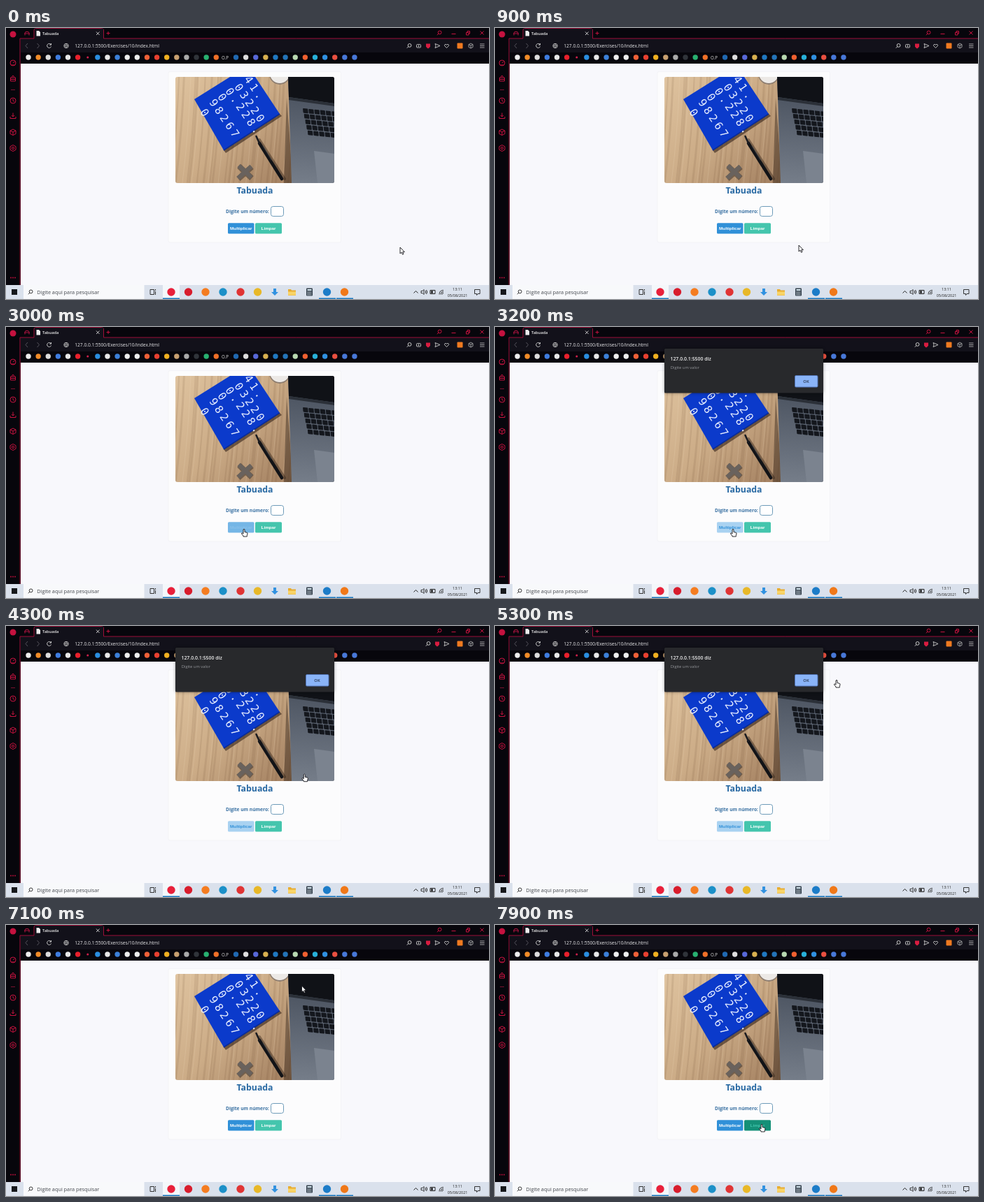
Write an HTML page with a canvas that moves like this. It is 690x388 px and loops after 8000 ms.

```html
<!DOCTYPE html>
<html lang="pt">
<head>
<meta charset="utf-8">
<title>Tabuada</title>
<style>
html, body { margin: 0; width: 100%; height: 100%; overflow: hidden; }
canvas { display: block; width: 690px; height: 388px; }
</style>
</head>
<body>
<canvas id="stage" width="690" height="388"></canvas>
<script>
const c = document.getElementById('stage').getContext('2d');
const LOOP = 8000, RED = '#c5123f', SANS = '"Open Sans", sans-serif', ARIAL = '"Liberation Sans", sans-serif';
const BLUE = [48, 144, 216], PALE = [169, 210, 241], WHITE = [255, 255, 255],
      GREEN = [68, 197, 173], DARK_GREEN = [20, 144, 119];

const ramp = (t, a, b) => Math.min(1, Math.max(0, (t - a) / (b - a)));
const mix = (a, b, p) => `rgb(${a.map((v, i) => Math.round(v + (b[i] - v) * p))})`;

function rect(x, y, w, h, fill, r = 0, stroke, width) {
  c.beginPath();
  c.roundRect(x, y, w, h, r);
  paint(fill, stroke, width);
}
function paint(fill, stroke, width = 1) {
  if (fill) { c.fillStyle = fill; c.fill(); }
  if (stroke) { c.strokeStyle = stroke; c.lineWidth = width; c.stroke(); }
}
function dot(x, y, r, fill, stroke) {
  c.beginPath();
  c.arc(x, y, r, 0, 7);
  paint(fill, stroke);
}
function path(d, fill, stroke, width = 1, x = 0, y = 0) {
  const p = new Path2D(d);
  c.save();
  c.translate(x, y);
  if (fill) { c.fillStyle = fill; c.fill(p); }
  if (stroke) { c.strokeStyle = stroke; c.lineWidth = width; c.stroke(p); }
  c.restore();
}
function text(s, x, y, font, fill, align = 'left') {
  c.font = font;
  c.fillStyle = fill;
  c.textAlign = align;
  c.fillText(s, x, y);
}
function lens(x, y, color) {
  dot(x + .6, y - .6, 2.4, null, color);
  path('M-1.2 1.2L-3.2 3.2', null, color, 1, x, y);
}

const bookmarks = ('#eee #f28c28 #ddd #3f7de0 #e8e8e8 #e8202c #d0204c #2a8ee0 #e8e8e8 #3c80d8 #eee #eee #f06038 ' +
  '#e84030 #f0b020 #c8a070 #aaa #30343a #28b070 #f07028 - #2068b0 #ddd #5868d8 #d8b050 #2078c0 #2474b8 #b8d8b0 ' +
  '#f06030 #28b0d8 #3090e0 #e85040 #4878d8 #4878d8').split(' ');

function browser(modal) {
  rect(0, 0, 690, 51, '#07060c');
  rect(0, 15, 21, 353, '#07060c');
  rect(21, 15, 669, 20, '#12111a');
  path('M20 368V15H40V3Q40 .5 43 .5H136.5Q139.5 .5 139.5 3V15H690', null, '#9c0f38');
  rect(41, 1, 98, 15, '#12111a');
  path('M43.5 4H47L49 6V11.5H43.5Z', '#eee');
  text('Tabuada', 52, 10.2, '600 5.7px ' + SANS, '#eee');
  path('M129 5.5l4.5 4.5M133.5 5.5l-4.5 4.5', null, '#ccc');
  path('M143.5 7.5h5M146 5v5', null, RED);
  path('M27 10.5v-3l1-2h4l1 2v3M26 8h8', null, '#b01440');
  lens(619, 7, RED);
  path('M636.5 8.5h6M657.5 6.5h3.5v3.5h-3.5zM659 6v-1.5h3.5v3.5h-1.5M677.5 4.5l5 5M682.5 4.5l-5 5', null, RED);

  path('M31 22l-3 3.5 3 3.5', null, '#55535c');
  path('M44.5 22l3 3.5-3 3.5', null, '#55535c');
  path('M64 23.5A3 3 0 1 0 64.5 26.5M64.5 22v2.2h-2.2', null, '#ccc');
  dot(86, 25.5, 3.2, null, '#bbb');
  path('M83 25.5h6M86 22.5q-3 3 0 6q3-3 0-6', null, '#bbb', .7);
  text('127.0.0.1:5500/Exercises/10/index.html', 98.3, 28, '6.62px ' + SANS, '#e8e8ea');

  const x = modal ? 603 : 576;
  lens(x, 25.5, '#ccc');
  if (!modal) {
    rect(586.5, 23.5, 6, 4.5, null, 1, '#bbb');
    dot(589.5, 25.7, 1, '#bbb');
  }
  const s = modal ? 616 : 603;
  path('M-3-3H3V1Q2 3 0 4Q-2 3-3 1Z', '#d81c40', null, 1, s, 25.5);
  path('M-3-3L4 0L-3 3L-2 0Z', null, '#ccc', .9, s + 13, 25.5);
  if (!modal) path('M0 3L-3 0Q-3.5-3 0-1.5Q3.5-3 3 0Z', null, '#ccc', .9, 629.5, 25.5);
  rect(644.5, 21.5, 8, 8, '#ef7a20', 1);
  path('M664 22l3 1.6v3.8l-3 1.6-3-1.6v-3.8zM661 23.6l3 1.6 3-1.6M664 25.2v3.8', null, '#bbb', .8);
  path('M677 23h6.5M677 25.5h6.5M677 28h6.5', null, '#ccc', .8);

  bookmarks.forEach((color, i) => {
    const bx = 32 + 14.12 * i;
    if (color === '-') text('O.P', 313, 44.5, '6.2px ' + SANS, '#ddd', 'center');
    else dot(bx, 42, i === 6 ? 1.5 : 3.7, color);
  });

  dot(10, 9, 4.5, RED);
  dot(10, 50, 4, null, RED);
  path('M10 50l2.5-2M7.5 53h5', null, RED);
  path('M6.5 71h7v5h-7zM8 70.5l2-2.5 2 2.5M6 73.5h8', null, RED);
  path('M7 88.5h6', null, '#78122f');
  dot(10, 104, 4, null, RED);
  path('M10 101.5v2.5l2 1.5', null, RED);
  path('M10 121.5v5.5M8 125l2 2 2-2M6 127v2.5h8v-2.5', null, RED);
  path('M10 145l4 2v4.5l-4 2-4-2v-4.5zM6 147l4 2 4-2M10 149v4.5', null, RED);
  path('M10 167.5l4 2.2v4.6l-4 2.2-4-2.2v-4.6z', null, RED);
  dot(10, 172, 1.6, null, RED);
  for (let i = -1; i < 2; i++) dot(10 + 3 * i, 357.5, .9, RED);
}

function laptop() {
  path('M397 222L401 100L410 222Z', 'rgba(50,34,24,.45)');
  const metal = c.createLinearGradient(440, 100, 430, 222);
  metal.addColorStop(0, '#4d5562');
  metal.addColorStop(1, '#757d89');
  path('M403 70H469V222H408Z', metal);
  path('M403 70H469V108L404 99Z', '#101217');
  path('M404 99L469 108V112L404 103Z', '#2b3038');
  c.save();
  c.transform(1, .1, .09, 1, 424, 115);
  for (let row = 0; row < 5; row++)
    for (let col = 0; col < 6; col++) rect(col * 8.2 + row, row * 7.8, 7.2, 6.6, '#14171d', 1);
  c.restore();
  path('M440 176L469 180V222H445Z', '#7b838f');
}

function photo() {
  c.save();
  c.beginPath();
  c.roundRect(242, 70, 227, 152, 3);
  c.clip();
  const wood = c.createLinearGradient(242, 70, 410, 222);
  wood.addColorStop(0, '#dfc39f');
  wood.addColorStop(.5, '#cbab86');
  wood.addColorStop(1, '#a07d5e');
  rect(242, 70, 227, 152, wood);
  for (let i = 0; i < 30; i++) {
    const x = 232 + i * 6 + 3 * Math.sin(i * 5);
    path(`M${x} 222Q${x + 9} 150 ${x + 12} 70`, null, i % 3 ? 'rgba(100,68,42,.12)' : 'rgba(240,218,188,.2)', 1 + i % 3);
  }
  path('M311 175L314 179L394 126L391 123Z', 'rgba(50,32,22,.6)');
  path('M269 102L320 70H356L391 123L311 175Z', '#0b3acb');
  path('M311 175L391 123', null, '#092b98', 1.5);
  [['41.', 347, 74], ['03220', 333, 85], ['0.228.', 320, 91], ['0', 309, 99], ['98267', 297, 107], ['0', 284, 121]]
    .forEach(([row, x, y]) => {
      c.save();
      c.translate(x, y);
      c.rotate(.97);
      [...row].forEach((ch, i) => text(ch, i * 13.3, 5.5, '15.5px "DejaVu Sans Mono", monospace', '#e6edff', 'center'));
      c.restore();
    });
  dot(391, 66, 15, '#8d7d70');
  dot(391, 65, 14, '#ece9e6');
  laptop();
  c.lineCap = 'round';
  path('M362 160L398 216', null, 'rgba(50,34,24,.45)', 4);
  path('M362 165L394 216', null, '#121317', 4.6);
  path('M357.5 155L362 165', null, '#1c1c20', 2.6);
  path('M367 169L379 189', null, '#454951', .8);
  c.lineCap = 'butt';
  path('M-8-9L10 8M10-8L-9 9', null, 'rgba(48,42,38,.5)', 8, 341, 207);
  path('M-8-9L10 8M10-8L-9 9', null, '#69625d', 6, 340.5, 206);
  c.restore();
}

function button(label, x, w, fill, color) {
  rect(x, 279.3, w, 15.2, fill, 1.5);
  text(label, x + w / 2, 289.2, 'bold 6.25px ' + ARIAL, color, 'center');
}

function page(t) {
  rect(21, 51, 669, 317, '#f8f8fc');
  rect(232, 62.5, 246.5, 244.5, '#fcfcfd', 2, '#f3f3f7');
  photo();
  text('Tabuada', 355.5, 237.3, 'bold 12.3px ' + SANS, '#2869a3', 'center');
  text('Digite um número:', 314, 264.7, 'bold 6.65px ' + SANS, '#3870a2');
  rect(378.5, 255.5, 18, 14, '#fff', 3, '#4a82a8', .8);

  const bg = ramp(t, 2800, 3150) - ramp(t, 6600, 7000);
  const fg = ramp(t, 2800, 3150) - ramp(t, 6500, 6700);
  const over = ramp(t, 7700, 7900);
  button('Multiplicar', 317, 37.5, mix(BLUE, PALE, bg), mix(WHITE, BLUE, fg));
  button('Limpar', 356, 38, mix(GREEN, DARK_GREEN, over), mix(WHITE, GREEN, over));
}

function dialog(t) {
  const out = ramp(t, 6600, 6900);
  if (t < 3050 || out === 1) return;
  c.save();
  c.globalAlpha = ramp(t, 3000, 3200) * (1 - out * out);
  c.translate(0, -9 * out);
  c.shadowColor = 'rgba(0,0,0,.4)';
  c.shadowBlur = 4;
  rect(242, 31, 227, 63.5, '#28292c', 1.5);
  c.shadowBlur = 0;
  text('127.0.0.1:5500 diz', 250.5, 47.7, '600 6.9px ' + SANS, '#f0f0f0');
  text('Digite um valor', 250.7, 60.3, '5.8px ' + SANS, '#96989c');
  rect(428.5, 69.5, 32.5, 16.5, t > 5800 ? '#84a9ea' : '#8ab4f8', 1.5, '#5274b4');
  text('OK', 444.5, 79.8, '600 5.8px ' + SANS, '#26334c', 'center');
  c.restore();
}

const apps = [['#e8203a', 236], ['#d81c2c', 260.5], ['#f47c20', 285], ['#1c90c8', 310], ['#e03434', 335],
  ['#e8b828', 359.5], ['#1c7cc8', 458.5], ['#f07818', 483.5]];

function taskbar() {
  rect(0, 368, 690, 20, '#dae1ec');
  rect(8, 374, 8, 8, '#16181c');
  rect(25, 368, 172.5, 20, '#f8f9fb');
  lens(35, 378, '#333');
  text('Digite aqui para pesquisar', 44.3, 381, '7.3px ' + SANS, '#42464c');
  path('M206 374.5h5.5v7H206zM213.5 374v2M213.5 377v5', null, '#333');
  rect(224, 368, 24, 20, '#f4f7fa');
  for (const x of [224, 447, 472]) rect(x, 386.5, 24, 1.5, '#1a78c0');
  for (const [color, x] of apps) dot(x, 378, 5.7, color);
  path('M382 373h4v5h3l-5 5-5-5h3z', '#3292e0');
  path('M403 374h4l1 1.5h6v7.5h-11z', '#e8ac30');
  rect(403, 377.5, 11, 5, '#f8d468');
  rect(429, 372.5, 9, 11, '#36424e', 1);
  rect(430.5, 374, 6, 2, '#d8e8f0');
  for (let i = 0; i < 9; i++) rect(430.5 + i % 3 * 2.2, 377.3 + (i / 3 | 0) * 2, 1.3, 1.2, '#cfd8e0');

  path('M582.5 379.5l3-3 3 3', null, '#222');
  path('M593 376.5h2l2-2v7l-2-2h-2zM599 376q1.5 2 0 4M600.5 375q2.5 3 0 6', null, '#222', .9);
  rect(606, 375.5, 7, 5, null, 0, '#222');
  rect(607, 376.5, 3, 3, '#222');
  path('M619 381.5q0-6 6-6M621 381.5q0-4 4-4M623 381.5q0-2 2-2', null, '#222', .9);
  text('13:11', 645, 376, '5.4px ' + SANS, '#222', 'center');
  text('05/08/2021', 645, 384.6, '5.4px ' + SANS, '#222', 'center');
  path('M669.5 374.5h7.5v6h-3l-1.5 2v-2h-3z', null, '#222', .9);
}

// time, x, y of the pointer tip
const route = [[0, 563, 314], [100, 563, 314], [900, 434, 311], [1900, 364, 312], [2200, 362, 312], [2600, 358, 309],
  [2900, 340, 289], [3850, 340, 289], [4700, 503, 143], [5300, 488, 77], [5450, 488, 77], [5900, 449, 77],
  [6900, 449, 77], [7300, 396, 97], [7700, 379, 270], [7900, 381, 285], [LOOP, 381, 285]];

function pointer(t) {
  const i = route.findIndex(k => k[0] > t);
  const [t0, x0, y0] = route[i - 1], [t1, x1, y1] = route[i];
  const p = (t - t0) / (t1 - t0), x = x0 + (x1 - x0) * p, y = y0 + (y1 - y0) * p;
  const hand = t >= 2800 && t < 5500 || t >= 7700;
  path(hand
    ? 'M-1 7V1Q0-.5 1 1V4.5L4 5.2Q5.2 5.5 5 7L4.3 9.5V11H-1V10L-3.5 7Q-3.5 5.5-2.3 6Z'
    : 'M0 0V9L2 7.2L3.5 10.3L5 9.6L3.6 6.7H6.4Z', '#fff', '#15151a', .9, x, y);
}

function draw(now) {
  const t = now % LOOP;
  page(t);
  browser(t >= 3050 && t < 6600);
  dialog(t);
  taskbar();
  pointer(t);
}

let start;
function tick(now) {
  start ??= now;
  draw(now - start);
  requestAnimationFrame(tick);
}
draw(0);
requestAnimationFrame(tick);
</script>
</body>
</html>
```
